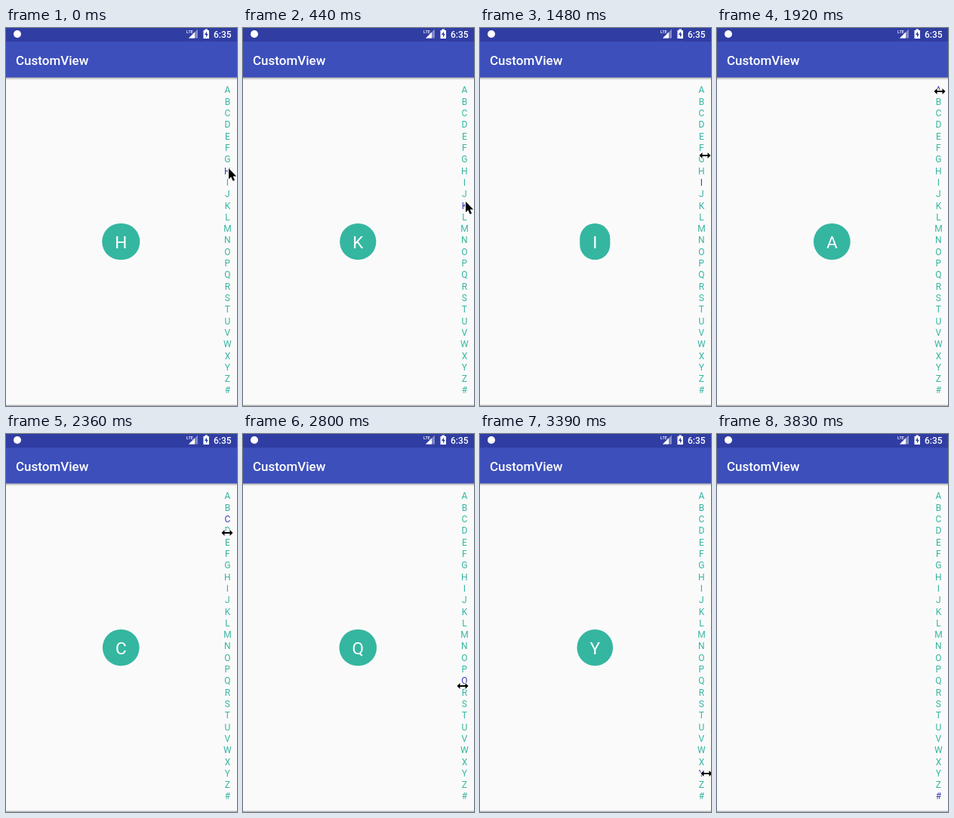
Recreate the animation shown at these times as an HTML page. Size 306 by 501 pixels, loop 4.13 s.

```html
<!DOCTYPE html>
<html lang="en">
<head>
<meta charset="utf-8">
<title>CustomView</title>
<style>
  html, body { margin: 0; width: 100%; height: 100%; overflow: hidden; background: #fafafa; }
  svg { display: block; width: 306px; height: 501px; }
  text { font-family: Roboto, sans-serif; fill: #fff; }
  .bold { font-weight: 500; }
  #index text { font-size: 12px; text-anchor: middle; fill: #36b5a0; }
  #index .on { fill: #383fb4; }
  #bubble rect { fill: #35b6a1; }
  #bubble text { font-size: 22.6px; text-anchor: middle; }
  .cursor { fill: #000; stroke: #fff; stroke-width: 1.8; paint-order: stroke; stroke-linejoin: round; }
</style>
</head>
<body>
<svg viewBox="0 0 306 501">
  <defs>
    <linearGradient id="shade" x2="0" y2="1">
      <stop offset="0" stop-color="#000" stop-opacity=".34"/>
      <stop offset="1" stop-color="#000" stop-opacity="0"/>
    </linearGradient>
  </defs>
  <rect width="306" height="501" fill="#fafafa"/>
  <rect y="65" width="306" height="4" fill="url(#shade)"/>
  <rect y="18" width="306" height="47.5" fill="#3d4fbb"/>
  <rect width="306" height="18" fill="#303da3"/>
  <rect y="499.5" width="306" height="1.5" fill="#b9b9b9"/>

  <circle cx="15" cy="8" r="5" fill="#fff"/>
  <path d="M242 13.5L254 1.5V13.5Z" fill="#fff" opacity=".4"/>
  <path d="M242 13.5L250 5.5V13.5Z" fill="#fff"/>
  <text class="bold" x="239" y="7" font-size="5.5">LTE</text>
  <path d="M261.5 3H263.5V1.5H267V3H269V14H261.5Z" fill="#fff"/>
  <path d="M266 4.5L263 9H265V12.5L267.8 7.8H266Z" fill="#303da3"/>
  <text class="bold" x="275" y="12.6" font-size="12">6:35</text>
  <text class="bold" x="13" y="48.8" font-size="17">CustomView</text>

  <g id="index"></g>
  <g id="bubble">
    <rect y="259" height="48.3"/>
    <text x="152.3" y="291.5"></text>
  </g>
  <path id="arrow" class="cursor" d="M0 0V14.2L3.2 11.3L5.6 16.8L8 15.8L5.7 10.4H10.2Z"/>
  <path id="resize" class="cursor" d="M-7.5 0L-3.5-4V-1H3.5V-4L7.5 0L3.5 4V1H-3.5V4Z"/>
</svg>
<script>
const LOOP = 4130;
const LETTERS = "ABCDEFGHIJKLMNOPQRSTUVWXYZ#";

// time, letter, pointer x, pointer y
const STEPS = [
  [0, "H", 295, 186], [150, "I", 295, 199], [300, "K", 295, 230],
  [450, "N", 295, 275], [590, "P", 295, 312], [740, "S", 296, 348],
  [880, "T", 296, 372], [1030, "U", 296, 377], [1180, "R", 297, 326],
  [1330, "M", 298, 238], [1480, "I", 298, 169], [1630, "F", 297, 130],
  [1770, "C", 296, 98], [1920, "A", 295, 84], [2070, "A", 294, 88],
  [2220, "B", 293, 104], [2360, "C", 293, 131], [2510, "H", 292, 205],
  [2650, "M", 291, 278], [2800, "Q", 291, 334], [2950, "T", 293, 378],
  [3090, "W", 296, 417], [3240, "X", 298, 437], [3390, "Y", 300, 450],
  [3530, "Z", 300, 466], [3680, "#", 300, 480], [3830, "#"]
];
const RESIZE_FROM = 1330;

const find = s => document.querySelector(s);
const show = (el, on) => el.setAttribute("visibility", on ? "visible" : "hidden");

const items = [...LETTERS].map((letter, i) => {
  const el = document.createElementNS("http://www.w3.org/2000/svg", "text");
  el.textContent = letter;
  el.setAttribute("x", 293.4);
  el.setAttribute("y", 86.4 + i * 15.31);
  return find("#index").appendChild(el);
});
const bubble = find("#bubble");
const [box, label] = bubble.children;
const arrow = find("#arrow");
const resize = find("#resize");

function setBubble(letter) {
  label.textContent = letter;
  const w = 34 + label.getComputedTextLength();
  const r = Math.min(24.1, w / 2);
  const attrs = { x: 152.3 - w / 2, width: w, rx: r, ry: r };
  for (const key in attrs) box.setAttribute(key, attrs[key]);
}

function draw([time, letter, x, y]) {
  const active = x !== undefined;
  const wide = time >= RESIZE_FROM;
  items.forEach((el, i) => el.classList.toggle("on", LETTERS[i] === letter));
  setBubble(letter);
  show(bubble, active);
  show(arrow, active && !wide);
  show(resize, active && wide);
  if (active) (wide ? resize : arrow).setAttribute("transform", `translate(${x} ${y})`);
}

const start = performance.now();
let current;
function tick(now) {
  const t = Math.max(0, now - start) % LOOP;
  const step = STEPS.findLast(s => s[0] <= t);
  if (step !== current) draw(current = step);
  requestAnimationFrame(tick);
}
tick(start);
</script>
</body>
</html>
```
